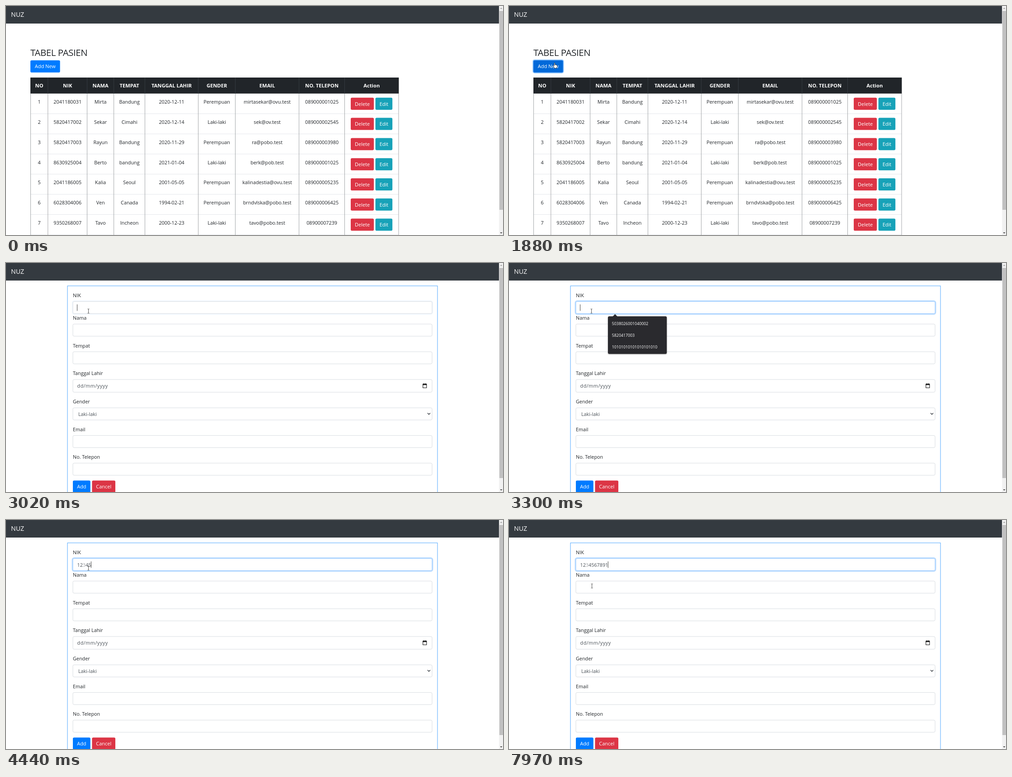
These frames come from a looping animation (1100 px wide and 509 px high, 8 s). An HTML page:

```html
<!DOCTYPE html>
<html lang="id">
<head>
<meta charset="utf-8">
<title>Tabel Pasien</title>
<style>
  html, body { margin: 0; width: 100%; height: 100%; overflow: hidden; background: #fff; }
  svg { display: block; width: 100%; height: 100%; }
  text { font: 10.8px "Open Sans", "Noto Sans", sans-serif; fill: #212529; white-space: pre; }
  .mid { text-anchor: middle; }
  .head { font-size: 11.2px; font-weight: 700; fill: #fff; }
  .btn { font-size: 11px; fill: #fff; text-anchor: middle; }
  .brand { font-size: 14.2px; fill: #fff; }
  .title { font-size: 20.4px; font-weight: 500; letter-spacing: -.4px; }
  .value { fill: #495057; }
  .date { letter-spacing: .5px; }
  .hint { font-size: 8.8px; fill: #fff; }
</style>
</head>
<body>
<svg id="stage" viewBox="0 0 1100 509" preserveAspectRatio="none"></svg>
<script>
const LOOP = 8000;
const BLUE = '#007bff', RED = '#dc3545', TEAL = '#17a2b8';

const text = (x, y, s, cls = '') => `<text x="${x}" y="${y}" class="${cls}">${s}</text>`;
const rect = (x, y, w, h, fill, more = '') =>
  `<rect x="${x}" y="${y}" width="${w}" height="${h}" fill="${fill}" ${more}/>`;
const path = (d, more) => `<path d="${d}" ${more}/>`;
const button = (x, y, w, h, label, fill, id = '') =>
  rect(x, y, w, h, fill, `rx="2.8" ${id}`) + text(x + w / 2, y + h / 2 + 4.2, label, 'btn');

// Table page
const edges = [54.4, 92.8, 179.6, 238.7, 307.6, 425.6, 507.6, 648.6, 749.6, 869];
const heads = ['NO', 'NIK', 'NAMA', 'TEMPAT', 'TANGGAL LAHIR', 'GENDER', 'EMAIL', 'NO. TELEPON', 'Action'];
const P = 'Perempuan', L = 'Laki-laki';
const rows = [
  ['2041180031', 'Mirta', 'Bandung', '2020-12-11', P, 'mirtasekar@ovu.test', '089000001025'],
  ['5820417002', 'Sekar', 'Cimahi', '2020-12-14', L, 'sek@ov.test', '089000002545'],
  ['5820417003', 'Rayun', 'Bandung', '2020-11-29', P, 'ra@pobo.test', '089000003980'],
  ['8630925004', 'Berto', 'bandung', '2021-01-04', L, 'berk@pob.test', '089000001025'],
  ['2041186005', 'Kalia', 'Seoul', '2001-05-05', P, 'kalinadestia@ovu.test', '089000005235'],
  ['6028304006', 'Ven', 'Canada', '1994-02-21', P, 'brndvlska@pobo.test', '089000006425'],
  ['9350268007', 'Tavo', 'Incheon', '2000-12-23', L, 'tavo@pobo.test', '08900007239'],
];
const center = i => (edges[i] + edges[i + 1]) / 2;

function tablePage() {
  const top = 194.6, pitch = 44.8;
  let s = text(54, 110.8, 'TABEL PASIEN', 'title');
  s += rect(54, 120.7, 65.6, 27, BLUE, 'id="ring" rx="2.8" stroke="#007bff" stroke-width="4" opacity="0"');
  s += button(54, 120.7, 65.6, 27, 'Add New', BLUE, 'id="addNew"');
  rows.forEach((row, r) => {
    const y = top + r * pitch;
    [r + 1, ...row].forEach((v, c) => s += text(center(c), y + 22.6, v, 'mid'));
    s += button(763, y + 9.2, 51.2, 27, 'Delete', RED) + button(817.6, y + 9.2, 37.6, 27, 'Edit', TEAL);
    s += rect(54, y + pitch - .4, 815, .8, '#dee2e6');
  });
  edges.forEach(x => s += rect(x - .4, top, .8, 320, '#8d9094'));
  s += rect(54, 159, 815.4, 35.6, '#212529');
  edges.slice(1, -1).forEach(x => s += rect(x - .4, 159, .8, 35.6, '#3a4046'));
  heads.forEach((h, i) => s += text(center(i), 181.3, h, 'mid head'));
  return s + scrollbar(453);
}

// Form page
const fields = [
  ['NIK', 85.5, 27], ['Nama', 135.7, 27], ['Tempat', 197.2, 27], ['Tanggal Lahir', 259, 28.2],
  ['Gender', 321.9, 27], ['Email', 383.4, 27], ['No. Telepon', 444.8, 27],
];

function formPage() {
  let s = rect(136, 50.9, 819, 480, '#fff', 'stroke="#1e90ff" stroke-width=".8"');
  s += rect(148, 85.5, 795, 27, 'none', 'id="glow" rx="3" stroke="#007bff" stroke-width="5" opacity="0"');
  fields.forEach(([label, y, h], i) => {
    s += text(148, y - 9.6, label);
    s += rect(148, y, 795, h, '#fff', `rx="2.8" stroke="#ced4da" stroke-width=".8" ${i ? '' : 'id="nik"'}`);
  });
  s += text(157.6, 277.3, 'dd/mm/yyyy', 'value date') + text(160, 339.8, L, 'value');
  s += path('M922.8 269.3h8v8.2h-8z M925 267.2v2 M928.8 267.2v2', 'fill="none" stroke="#111" stroke-width="1.1"');
  s += rect(922.5, 268.6, 8.6, 2.6, '#111');
  s += path('M933 333.6l3 3 3-3', 'fill="none" stroke="#343a40" stroke-width="1.4"');
  s += button(148, 483.4, 38.8, 27, 'Add', BLUE) + button(190.4, 483.4, 51.6, 27, 'Cancel', RED);
  s += '<text id="typed" x="157.5" y="103.8" class="value"></text>';
  s += rect(0, 92, .9, 14.4, '#333', 'id="caret"');
  s += '<g id="popup"></g>';
  return s + scrollbar(478);
}

function scrollbar(bottom) {
  return rect(1091.4, 0, 8.6, 509, '#f1f1f1') + rect(1092, 11, 8, bottom - 11, '#c1c1c1') +
    path('M1093.4 6.6l2.6-3 2.6 3z', 'fill="#a3a3a3"') + path('M1093.4 503l2.6 3 2.6-3z', 'fill="#505050"');
}

const hints = ['5038026001040002', '5820417003', '10'.repeat(10)];
function popupBox(list) {
  const h = 6.2 + 25.8 * list.length;
  return `<g filter="url(#soft)">${rect(219, 118.5, 130.2, h, '#29292d', 'rx="3"')}` +
    path('M229.5 119l5.2-5.2 5.2 5.2z', 'fill="#29292d"') + '</g>' +
    list.map((v, i) => text(227.8, 137.9 + 25.8 * i, v, 'hint')).join('');
}

const cursors = {
  arrow: path('M0 0V10.2L2.4 8 4.1 11.7 5.7 11 4.1 7.4H7.3Z', 'fill="#fff" stroke="#111" stroke-width=".7"'),
  hand: path('M-1 .8C-1-.4 .8-.4 .8 .8V4.4L2.4 4.5 4 4.9 5.4 5.5C5.9 6 5.9 7 5.7 8.2L4.7 10.4V12H-.7V10.6L-3.3 7.2C-3.9 6-2.6 5.4-2 6.2L-1 7.2Z',
    'fill="#fff" stroke="#111" stroke-width=".7" stroke-linejoin="round"'),
  beam: path('M-1.9-4.7H-.5L0-4.2 .5-4.7H1.9M0-4.2V4.2M-1.9 4.7H-.5L0 4.2 .5 4.7H1.9', 'fill="none" stroke="#222" stroke-width=".8"'),
};

const stage = document.getElementById('stage');
stage.innerHTML =
  '<defs><filter id="soft" x="-10%" y="-15%" width="120%" height="130%">' +
  '<feDropShadow dx="0" dy="1" stdDeviation="1.2" flood-opacity=".4"/></filter></defs>' +
  rect(0, 0, 1100, 509, '#fff') + rect(0, 0, 1091.4, 39, '#343a40') + text(11, 24.4, 'NUZ', 'brand') +
  `<g id="table">${tablePage()}</g><g id="form">${formPage()}</g>` +
  Object.entries(cursors).map(([k, v]) => `<g id="${k}">${v}</g>`).join('');

const el = id => document.getElementById(id);
const set = (id, attrs) => { for (const k in attrs) el(id).setAttribute(k, attrs[k]); };
const show = (id, on) => set(id, { visibility: on ? 'visible' : 'hidden' });
const ramp = (t, a, b) => Math.min(1, Math.max(0, (t - a) / (b - a)));

// Pointer moves: first step, last step, number of steps, goal
const moves = [
  [310, 510, 4, 626, 268],
  [710, 920, 4, 183, 75],
  [1180, 1530, 6, 107.5, 124.5],
  [1600, 1880, 5, 101, 126.3],
  [2470, 2820, 6, 182.5, 106.8],
  [7410, 7970, 9, 183.6, 146.6],
];

function pointer(t) {
  let x = 1114, y = 559;
  for (const [a, b, n, gx, gy] of moves) {
    if (t < a) break;
    const k = Math.min(1, (Math.floor((t - a) / (b - a) * (n - 1) + .02) + 1) / n);
    x += (gx - x) * k;
    y += (gy - y) * k;
  }
  return [x, y];
}

function pointerKind(t, x, y) {
  if (t < 2010) return x < 119.6 && y > 120.7 ? 'hand' : 'arrow';
  const inside = fields.some(([, top, h]) => y > top && y < top + h);
  return x > 148 && inside ? 'beam' : 'arrow';
}

const keys = [3570, 3770, 3980, 4180, 4440, 4900, 5100, 5360, 5560, 6880];
const digits = '1234567891';
let typedCount = -1, popupSize = -1;

function draw(t) {
  const onForm = t >= 2010;
  set('table', { display: onForm ? 'none' : 'inline' });
  set('form', { display: onForm ? 'inline' : 'none' });

  const hover = ramp(t, 1540, 1690);
  set('addNew', { fill: `rgb(0,${123 - 18 * hover},${255 - 38 * hover})` });
  set('ring', { opacity: .4 * ramp(t, 1770, 1880) });

  const focus = ramp(t, 2990, 3160);
  set('glow', { opacity: .25 * focus });
  set('nik', { stroke: focus > .5 ? '#80bdff' : '#ced4da' });

  const n = keys.filter(k => t >= k).length;
  if (n !== typedCount) {
    const s = digits.slice(0, n);
    el('typed').innerHTML = s.replace('3', '<tspan fill-opacity=".5">3</tspan>');
    typedCount = n;
  }
  const last = n ? keys[n - 1] : 3020;
  set('caret', { x: 157 + n * 6.178 });
  show('caret', onForm && t >= 3020 && Math.floor((t - last) / 530) % 2 === 0);

  const size = n ? 1 : 3;
  if (size !== popupSize) {
    el('popup').innerHTML = popupBox(hints.slice(-size));
    popupSize = size;
  }
  const step = 70 * Math.floor((t - 3770) / 70);
  const fade = t < 3770 ? ramp(t, 3090, 3280) : 1 - ramp(step, -70, 140) * .78 - ramp(step, 70, 140) * .22;
  const scale = t < 3770 ? 1 : 1 - .035 * (1 - fade);
  set('popup', { opacity: fade, transform: `translate(284.2 134.4) scale(${scale}) translate(-284.2 -134.4)` });

  const [x, y] = pointer(t), kind = pointerKind(t, x, y);
  for (const k in cursors) show(k, k === kind);
  set(kind, { transform: `translate(${x} ${y})` });
}

const start = performance.now();
function tick() {
  draw((performance.now() - start) % LOOP);
  requestAnimationFrame(tick);
}
draw(0);
requestAnimationFrame(tick);
</script>
</body>
</html>
```
